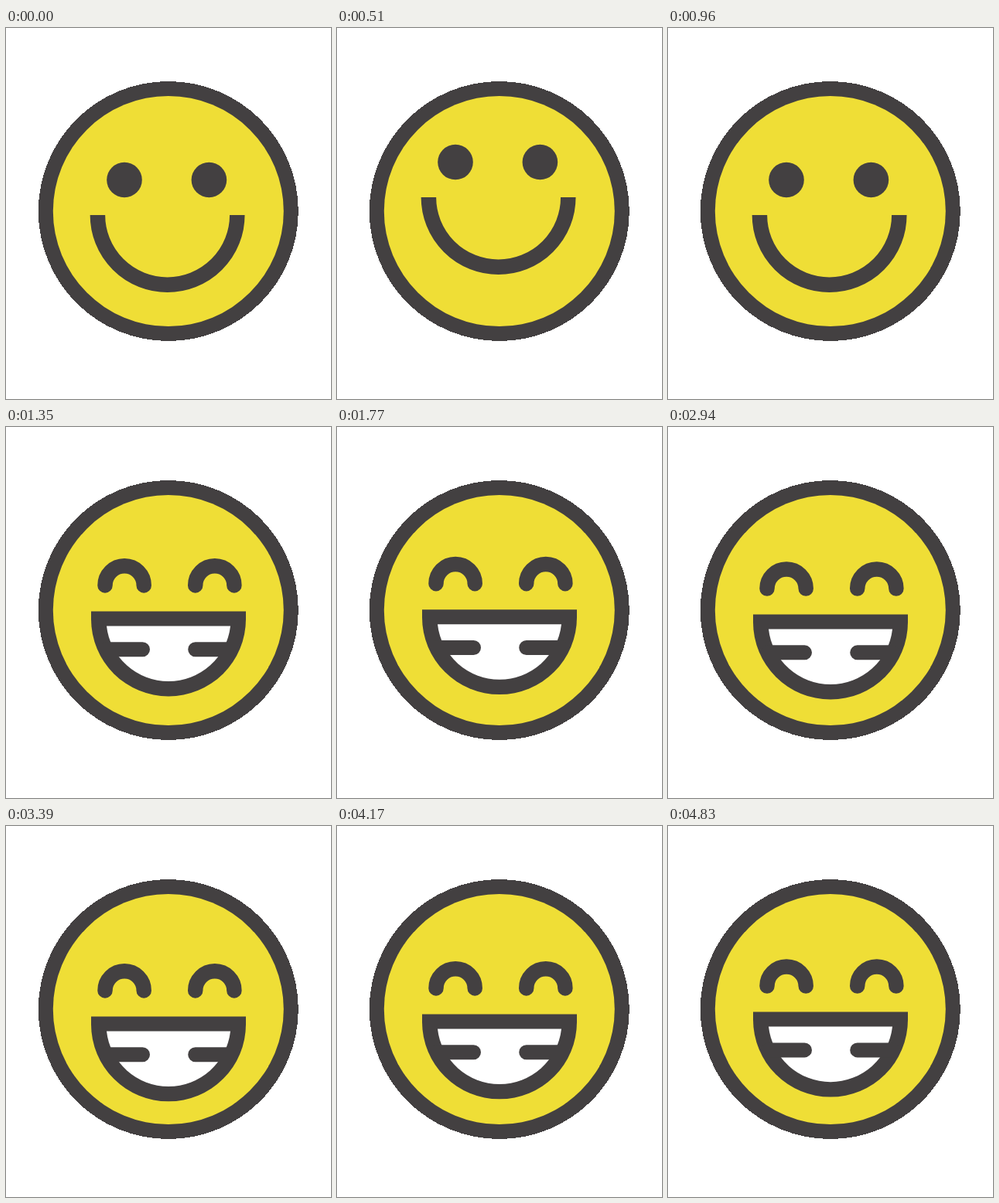
An HTML page that plays this animation: 420x480 px, repeating every 5370 ms.

```html
<!DOCTYPE html>
<html lang="en">
<head>
<meta charset="utf-8">
<title>Smile and laugh</title>
<style>
  html, body { margin: 0; width: 100%; height: 100%; overflow: hidden; background: #fff; }
  svg { display: block; width: 100%; height: 100%; }
  .ink { fill: #434041; }
  .line { fill: none; stroke: #434041; }
  .round { stroke-linecap: round; }
</style>
</head>
<body>
<svg viewBox="0 0 420 480">
  <circle class="ink" cx="209.8" cy="237" r="168" shape-rendering="crispEdges"/>
  <circle cx="209.8" cy="237" r="149" fill="#efde36"/>
  <g id="smile">
    <circle class="ink" cx="153" cy="196.5" r="22.8"/>
    <circle class="ink" cx="262.4" cy="196.5" r="22.8"/>
    <path class="line" stroke-width="19.5" d="M118.4 242a90.2 90.2 0 0 0 180.4 0"/>
  </g>
  <g id="laugh">
    <path class="line round" stroke-width="19.5" d="M128 202.5a25.1 25.1 0 0 1 50.2 0M244.7 202.5a25.1 25.1 0 0 1 50.2 0"/>
    <path class="ink" d="M110 236H310V246A100 100 0 0 1 110 246Z"/>
    <path fill="#fff" d="M130 255H290A80.5 80.5 0 0 1 130 255Z"/>
    <path class="line round" stroke-width="19" d="M130 285.3H176.5M244.7 285.3H290"/>
  </g>
</svg>
<script>
  const LOOP = 5370, STEP = 30, SWITCH = 1050;
  const smile = document.getElementById("smile");
  const laugh = document.getElementById("laugh");

  // [time in ms, vertical offset in px]
  const smileKeys = [[120, 0], [420, -25], [660, -15.5], [960, 0], [1050, 3.5]];
  const laughKeys = [
    [1050, 5], [1200, 3.4], [1740, 0.3], [2250, -2], [2520, 1.4], [2820, 5.2],
    [3390, 10.4], [3900, 9], [4170, 7.4], [4440, 6.2], [4830, 4.6]
  ];

  // Slope through a key; flat at the ends and at turning points.
  function slope(keys, i) {
    const a = keys[i - 1], b = keys[i], c = keys[i + 1];
    if (!a || !c || (b[1] - a[1]) * (c[1] - b[1]) <= 0) return 0;
    return (c[1] - a[1]) / (c[0] - a[0]);
  }

  function offset(keys, t) {
    const last = keys.length - 1;
    if (t <= keys[0][0]) return keys[0][1];
    if (t >= keys[last][0]) return keys[last][1];
    const i = keys.findIndex(k => k[0] > t) - 1;
    const [t0, y0] = keys[i], [t1, y1] = keys[i + 1];
    const d = t1 - t0, u = (t - t0) / d, v = 1 - u;
    return y0 * v * v * (1 + 2 * u) + y1 * u * u * (3 - 2 * u)
      + d * u * v * (v * slope(keys, i) - u * slope(keys, i + 1));
  }

  function pose(group, keys, t, shown) {
    group.setAttribute("display", shown ? "inline" : "none");
    group.setAttribute("transform", `translate(0 ${offset(keys, t).toFixed(2)})`);
  }

  function draw(now) {
    const t = Math.floor((now % LOOP) / STEP) * STEP;
    pose(smile, smileKeys, t, t < SWITCH);
    pose(laugh, laughKeys, t, t >= SWITCH);
  }

  let start;
  function tick(now) {
    if (start === undefined) start = now;
    draw(now - start);
    requestAnimationFrame(tick);
  }
  draw(0);
  requestAnimationFrame(tick);
</script>
</body>
</html>
```
